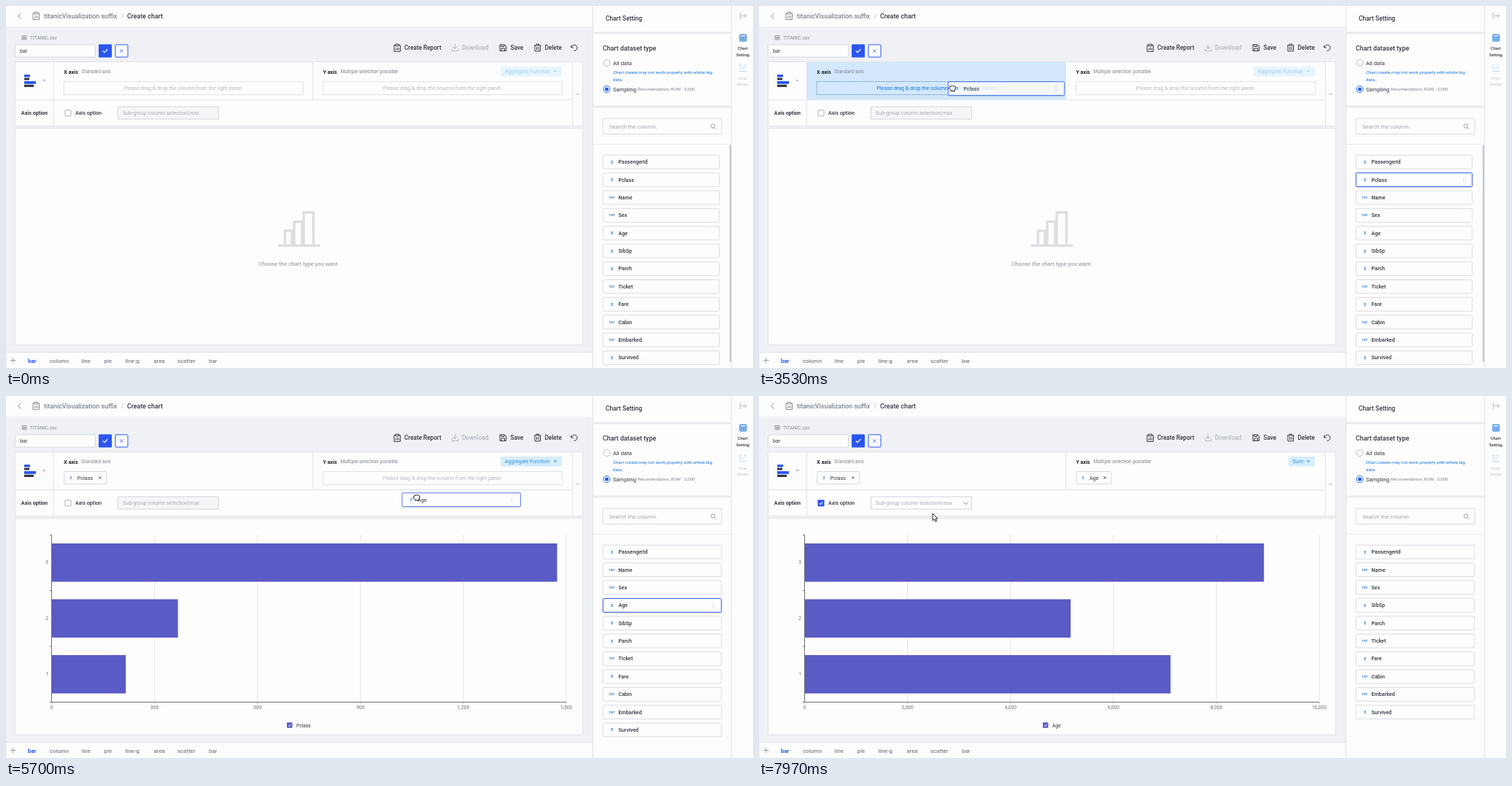
An HTML page for the animation above (8 s loop, 1024 by 496 pixels).

```html
<!DOCTYPE html>
<html lang="en">
<head>
<meta charset="utf-8">
<title>Create chart</title>
<style>
  html, body { margin: 0; width: 100%; height: 100%; overflow: hidden; background: #eff1f4; }
  svg { display: block; width: 1024px; height: 496px; font-family: Roboto, sans-serif; }
  text { white-space: pre; }
</style>
</head>
<body>
<svg id="stage" viewBox="0 0 1024 496"><g id="static"></g><g id="live"></g></svg>
<script>
const LOOP = 8000;
const WHITE = '#fdfdfe', LINE = '#dfe2e7', INK = '#33373e', GRAY = '#858b95', PALE = '#b3b8c0';
const BLUE = '#2b56f0', LINK = '#1271dc', BAR = '#5a5bc4';

// Drawing helpers; text is placed by the middle of its capitals.
const rect = (x, y, w, h, fill, stroke = 'none', extra = '') =>
  `<rect x="${x}" y="${y}" width="${w}" height="${h}" fill="${fill}" stroke="${stroke}" ${extra}/>`;
const path = (d, stroke, width = 1, fill = 'none', extra = '') =>
  `<path d="${d}" stroke="${stroke}" stroke-width="${width}" fill="${fill}" ${extra}/>`;
const text = (x, y, str, size, fill = INK, weight = 400, anchor = 'start') =>
  `<text x="${x}" y="${y + size * 0.36}" font-size="${size}" fill="${fill}" font-weight="${weight}" text-anchor="${anchor}">${str}</text>`;
const caret = (x, y, fill) => path(`M${x - 2.2} ${y - 1.2}h4.4l-2.2 2.6z`, 'none', 0, fill);
const tick = (x, y, size, color, width) =>
  path(`M${x - size} ${y}l${size * 0.7} ${size * 0.7}l${size * 1.3} ${-size * 1.4}`, color, width);
const cross = (x, y, r, color, width = 0.9) =>
  path(`M${x - r} ${y - r}l${2 * r} ${2 * r}m0 ${-2 * r}l${-2 * r} ${2 * r}`, color, width);
const clipboard = (x, y, color) =>
  path(`M${x + 2} ${y + 1.5}h-2v8.5h8.5v-8.5h-2M${x + 2} ${y}h4.5v2.5h-4.5zM${x + 2.3} ${y + 8}v-2m2 2v-3.5m2 3.5v-2.5`, color);
const table = (x, y, w, h, color, width) =>
  path(`M${x} ${y}h${w}v${h}h${-w}zM${x} ${y + h / 3}h${w}m0 ${h / 3}h${-w}M${x + w / 3} ${y + h / 3}v${h * 2 / 3}m${w / 3} 0v${-h * 2 / 3}`, color, width);

function drawStatic() {
  const panels =
    rect(0, 0, 1024, 496, '#eff1f4') +
    rect(0, 0, 804, 28, WHITE) +
    rect(0, 474.5, 804.5, 22, WHITE, LINE) +
    rect(12.5, 76.5, 778, 88, WHITE, LINE) +
    rect(12.5, 167.5, 778, 296.5, WHITE, LINE) +
    rect(804.5, -1, 190, 498, WHITE, LINE) +
    rect(995, 0, 29, 496, WHITE) +
    rect(805, 35.5, 189, 3, '#e9ebee') + rect(805, 136.5, 189, 3, '#e9ebee') +
    path('M805 189.5h189', '#e9ebee') +
    path('M65.5 76v88M776.5 76v88M13 128.5h763', LINE);

  const header =
    path('M20.5 10l-3.8 3.8 3.8 3.8', GRAY) +
    clipboard(37, 8.5, GRAY) +
    text(52, 14, 'titanicVisualization suffix', 8.9, '#7d838d', 500) +
    text(158, 14, '/', 8.9, PALE) +
    text(166, 14, 'Create chart', 8.9, INK, 500) +
    table(22, 40.5, 6, 5.5, GRAY, 0.7) +
    text(33, 43.5, 'TITANIC.csv', 6.66, GRAY) +
    rect(12.5, 53, 110, 17, WHITE, '#d5d9df', 'rx="1"') +
    text(19, 61.5, 'bar', 7.17) +
    rect(127, 52.5, 18, 18, BLUE, 'none', 'rx="1"') + tick(136, 61.5, 3.2, '#fff', 1.2) +
    rect(150, 53, 17, 17, WHITE, BLUE, 'rx="1"') + cross(158.5, 61.5, 2, BLUE);

  const tools =
    clipboard(532, 52.3, INK) + text(546, 57.5, 'Create Report', 8.19, INK, 500) +
    path('M615.5 52v6.5m-3-3l3 3 3-3M611.5 58.5v3h8.5v-3', PALE) +
    text(625, 57.5, 'Download', 8.19, PALE, 500) +
    path('M677 53h6.5l2 2v6.5h-8.5zM679 53v2.5h4v-2.5M679 61.5v-3.5h4.5v3.5', INK) +
    text(691.5, 57.5, 'Save', 8.19, INK, 500) +
    path('M724 54h9.5M727 54v-1.8h3.5v1.8M725 54v7.8h7.5v-7.8M727.6 56v4m2.4-4v4', INK) +
    text(738.5, 57.5, 'Delete', 8.19, INK, 500) +
    path('M774.8 54v3h3M775 57a4 4 0 1 1 3.5 4.3', INK);

  const settings =
    text(822, 16.5, 'Chart Setting', 8.5, INK, 500) +
    text(818, 58, 'Chart dataset type', 8.9, INK, 500) +
    `<circle cx="823.5" cy="78" r="4.5" fill="${WHITE}" stroke="#b8bdc6"/>` +
    text(832, 78, 'All data', 7.68) +
    text(832, 91, 'Chart create may not work properly with whole big', 6.14, LINK) +
    text(832, 100.5, 'data.', 6.14, LINK) +
    `<circle cx="823.5" cy="114" r="4.5" fill="${WHITE}" stroke="${LINK}"/><circle cx="823.5" cy="114" r="2.5" fill="${BLUE}"/>` +
    text(832, 114.5, 'Sampling', 7.68) +
    text(866, 114, 'Recomendation, ROW : 3,000', 6.14, '#7d838d') +
    rect(818, 154, 163, 21.5, WHITE, '#d5d9df', 'rx="1"') +
    text(827, 165, 'Search the column.', 7.68, '#9da3ac') +
    `<circle cx="969" cy="164.5" r="2.7" fill="none" stroke="${GRAY}" stroke-width=".8"/>` +
    path('M971 166.5l2.5 2.5', GRAY, 0.8) +
    path('M1006.5 9v9M1008 13.5h7m-3-3l3 3-3 3', PALE) +
    table(1006, 39.5, 8.5, 8.5, LINK, 1) +
    text(1010, 58, 'Chart', 5.63, INK, 500, 'middle') + text(1010, 66.5, 'Setting', 5.63, INK, 500, 'middle') +
    path('M1006 80v9.5h9M1008.5 87l2-3 2 1.5 2-3M1007 81h2m2 0h3', '#b9dcf5') +
    text(1010, 99, 'Chart', 5.63, '#c5c9cf', 400, 'middle') + text(1010, 106.5, 'design', 5.63, '#c5c9cf', 400, 'middle');

  const tabs = path('M6 485.5h7.5M9.7 481.7v7.5', GRAY, 0.8) +
    [['bar', 30], ['column', 60], ['line', 103.5], ['pie', 134.5], ['line-g', 163.5], ['area', 202.5], ['scatter', 235], ['bar', 278]]
      .map(([name, x], i) => text(x, 485.8, name, 7.8, i ? '#7d838d' : BLUE, i ? 500 : 700)).join('');

  return panels + header + tools + settings + tabs;
}

// Axis shelves
function chip(x, name) {
  const w = name === 'Pclass' ? 58 : 48;
  return rect(x + 0.5, 103.5, w, 17, WHITE, '#d5d9df', 'rx="1"') +
    text(x + 9.5, 112, '3', 5.4, LINK, 500, 'middle') +
    text(x + 18.5, 112, name, 7.17) + cross(x + w - 8.5, 112, 1.6, INK, 0.8);
}

function shelf(x, w, boxWidth, title, hint, hot, filled) {
  const left = x + 13.5;
  return (hot ? rect(x, 77, w, 51.5, '#d3e8fc') : '') +
    text(left, 90, title, 7.17, '#202329', 700) + text(left + 24, 90, hint, 6.66, '#7d838d') +
    (filled ? chip(left, filled)
      : rect(left, 103.5, boxWidth, 18, hot ? 'none' : WHITE, hot ? '#6d8fc4' : LINE, hot ? 'stroke-dasharray="1.5 1"' : '') +
        text(left + boxWidth / 2, 112.3, 'Please drag &amp; drop the column from the right panel.', 7.17, hot ? LINK : PALE, 400, 'middle'));
}

function aggregate(label, x, active) {
  const color = active ? '#2f8fdf' : '#9fd0f2';
  return rect(x, 83, 762 - x, 13.5, active ? '#d6edfb' : '#e6f4fd', 'none', 'rx="1"') +
    text(x + 5.5, 89.8, label, 7.17, color) + caret(753, 89.6, color);
}

function axisOptions(checked) {
  const box = checked
    ? rect(80.5, 142.3, 9, 9, BLUE, 'none', 'rx="1"') + tick(85, 147, 2.2, '#fff', 1.1)
    : rect(81, 142.8, 8, 8, WHITE, '#a9afb8', 'rx="1"');
  return text(39, 146.8, 'Axis option', 7.17, INK, 700, 'middle') + box +
    text(95, 146.8, 'Axis option', 7.17, INK, 500) +
    rect(153.5, 138, 138, 17, checked ? WHITE : '#f5f6f8', '#cfd3da', 'rx="1"') +
    text(160, 146.8, 'Sub-group column selection(max', 7.17, '#a6acb5') +
    (checked ? path('M280.5 145.5l3 3 3-3', GRAY) : '');
}

const chartTypeIcon = rect(25, 94, 8, 3.4, BLUE) + rect(25, 98.5, 7, 3, INK) + rect(25, 103, 16, 3.8, BLUE) +
  rect(25, 107.8, 13, 3.2, INK) + caret(52.5, 102.3, PALE) + path('M781.5 122l2-2 2 2', GRAY, 0.8);

// Column list
const COLUMNS = ['PassengerId', 'Pclass', 'Name', 'Sex', 'Age', 'SibSp', 'Parch', 'Ticket', 'Fare', 'Cabin', 'Embarked', 'Survived'];
const TEXT_COLUMNS = ['Name', 'Sex', 'Ticket', 'Cabin', 'Embarked'];
const rowTop = i => 204 + 24.38 * i;

function row(x, y, w, name, active) {
  const type = TEXT_COLUMNS.includes(name) ? 'TXT' : '3';
  let dots = '';
  if (active) for (let i = 0; i < 6; i++) dots += rect(x + w - 13 + (i % 2) * 2.6, y + 6.5 + (i >> 1) * 2.5, 1, 1, '#c9cdd4');
  return (active ? rect(x + 0.5, y + 2, w - 1, 19, '#000', 'none', 'rx="1" opacity=".1"') : '') +
    rect(x + 0.3, y + 0.3, w - 0.6, 18.8, WHITE, active ? BLUE : '#d9dde3', 'rx="1"') +
    text(x + 12.5, y + 9.7, type, type === '3' ? 5.4 : 4.2, LINK, 700, 'middle') +
    text(x + 21.5, y + 9.6, name, 7.17, INK, 500) + dots;
}

// Bar chart
const easeInOut = p => p < 0.5 ? 4 * p ** 3 : 1 - (2 - 2 * p) ** 3 / 2;
const clamp = p => Math.min(1, Math.max(0, p));

function chart({ name, step, widths, start }, t) {
  const grow = easeInOut(clamp((t - start) / 1000));
  let out = '';
  for (let i = 0; i <= 5; i++) {
    const x = 62.6 + 141.1 * i;
    if (i) out += path(`M${x} 190v229.5`, '#e3e6ec');
    out += path(`M${x} 419.5v3`, '#a2a5ac', 0.6) + text(x, 426.8, (i * step).toLocaleString('en-US'), 6.66, '#6e7079', 400, 'middle');
  }
  widths.forEach((w, i) => {
    const y = 202 + 76.5 * i;
    out += rect(63, y, w * grow, 52.5, BAR) + text(58, y + 25.8, 3 - i, 6.66, '#6e7079', 400, 'end');
  });
  out += path('M62.5 190v229.5H768M60 190.3h2.5M60 266.5h2.5M60 343h2.5M60 419.5h2.5', '#6e7079');
  const x = name === 'Age' ? 389 : 385;
  return out + rect(x, 447.3, 7.5, 7.5, BAR, 'none', 'rx="1"') + tick(x + 3.7, 451.2, 2, '#fff', 1) +
    text(x + 13, 451.2, name, 6.66);
}

const placeholder =
  path('M373 328.3h57.5M382.5 328v-20h9.5v20M395 328v-32.5h11v32.5M408 328v-45.3h13.5v45.3', '#dcdee2', 3.4) +
  text(401.5, 353, 'Choose the chart type you want.', 7.68, '#9da3ac', 500, 'middle');

const CHARTS = [
  { name: 'Pclass', step: 300, widths: [692.5, 172.7, 101.2], start: 4110 },
  { name: 'Age', step: 2000, widths: [629.2, 364.2, 501.2], start: 6190 },
];
const DRAGS = [
  { name: 'Pclass', from: 1680, to: 3600 },
  { name: 'Age', from: 5030, to: 5880 },
];
const CHECK_TIME = 7400;

// Pointer stops: time, x, y
const STOPS = [
  [850, 760, 505], [1400, 832, 249], [1620, 824, 238], [1720, 824, 238], [2470, 265.5, 119], [3600, 265, 113],
  [4270, 647, 233], [4950, 838, 284], [5070, 838, 284], [5720, 562, 139], [5880, 545, 114], [6230, 541.5, 115],
  [6550, 541.5, 115], [7200, 86, 147], [7480, 86, 147], [7970, 238, 161],
];

function pointerAt(t) {
  if (t < STOPS[0][0]) return null;
  const i = STOPS.findIndex(stop => stop[0] > t);
  const [t1, x1, y1] = STOPS.at(i), [t0, x0, y0] = STOPS.at(i < 0 ? -1 : i - 1);
  const p = t1 > t0 ? (t - t0) / (t1 - t0) : 1, s = p * p * (3 - 2 * p);
  return { x: x0 + (x1 - x0) * s, y: y0 + (y1 - y0) * s };
}

const arrow = ({ x, y }) => path(`M${x} ${y}v9.6l2.3-2 1.6 3.6 1.7-.8-1.6-3.4h3z`, '#111', 0.9, '#fff', 'stroke-linejoin="round"');
const fist = ({ x, y }) => path(`M${x - 3.5} ${y - 1.5}q.2-2 1.8-1.6q1-1.2 2.2-.3q1.2-.8 2.1.3q1.8-.1 1.8 1.7q.1 2.3-1.3 3.6v1.3h-5v-1.2l-2.4-2.2q-.8-1.4.8-1.6z`, '#111', 1, '#fff', 'stroke-linejoin="round"');

function drawLive(t) {
  const pointer = pointerAt(t);
  const drag = DRAGS.find(d => t >= d.from && t < d.to);
  const dropped = DRAGS.filter(d => t >= d.to).map(d => d.name);
  const columns = COLUMNS.filter(name => !dropped.includes(name));
  const rowWidth = dropped.length ? 163 : 160;
  const over = (x, y, w, h) => pointer && pointer.x >= x && pointer.x < x + w && pointer.y >= y && pointer.y < y + h;

  let out = shelf(65.8, 354.7, 328, 'X axis', 'Standard axis', drag && over(66, 76, 355, 52), dropped[0]) +
    shelf(421, 355.5, 328, 'Y axis', 'Multiple selection possible', drag && over(421, 76, 356, 52), dropped[1]) +
    path('M420.5 77v51.5', LINE) +
    (dropped[1] ? aggregate('Sum', 726, true) : aggregate('Aggregate Function', 678, dropped.length > 0)) +
    chartTypeIcon + axisOptions(t >= CHECK_TIME);

  const current = CHARTS.findLast(c => t >= c.start);
  out += current ? chart(current, t) : placeholder;

  columns.forEach((name, i) => {
    const active = drag ? drag.name === name : over(818, rowTop(i), rowWidth, 19.5);
    out += row(818, rowTop(i), rowWidth, name, active);
  });
  if (!dropped.length) out += rect(992, 190.5, 2, 297, '#c3c7ce', 'none', 'rx="1"');

  if (drag) {
    const grab = pointerAt(drag.from);
    const x = 818 + pointer.x - grab.x, y = rowTop(columns.indexOf(drag.name)) + pointer.y - grab.y;
    out += `<g opacity=".8">${row(x, y, rowWidth, drag.name, true)}</g>`;
  }
  if (pointer) out += drag ? fist(pointer) : arrow(pointer);
  return out;
}

document.getElementById('static').innerHTML = drawStatic();
const live = document.getElementById('live');
const begin = performance.now();
function frame() {
  live.innerHTML = drawLive((performance.now() - begin) % LOOP);
  requestAnimationFrame(frame);
}
frame();
</script>
</body>
</html>
```
